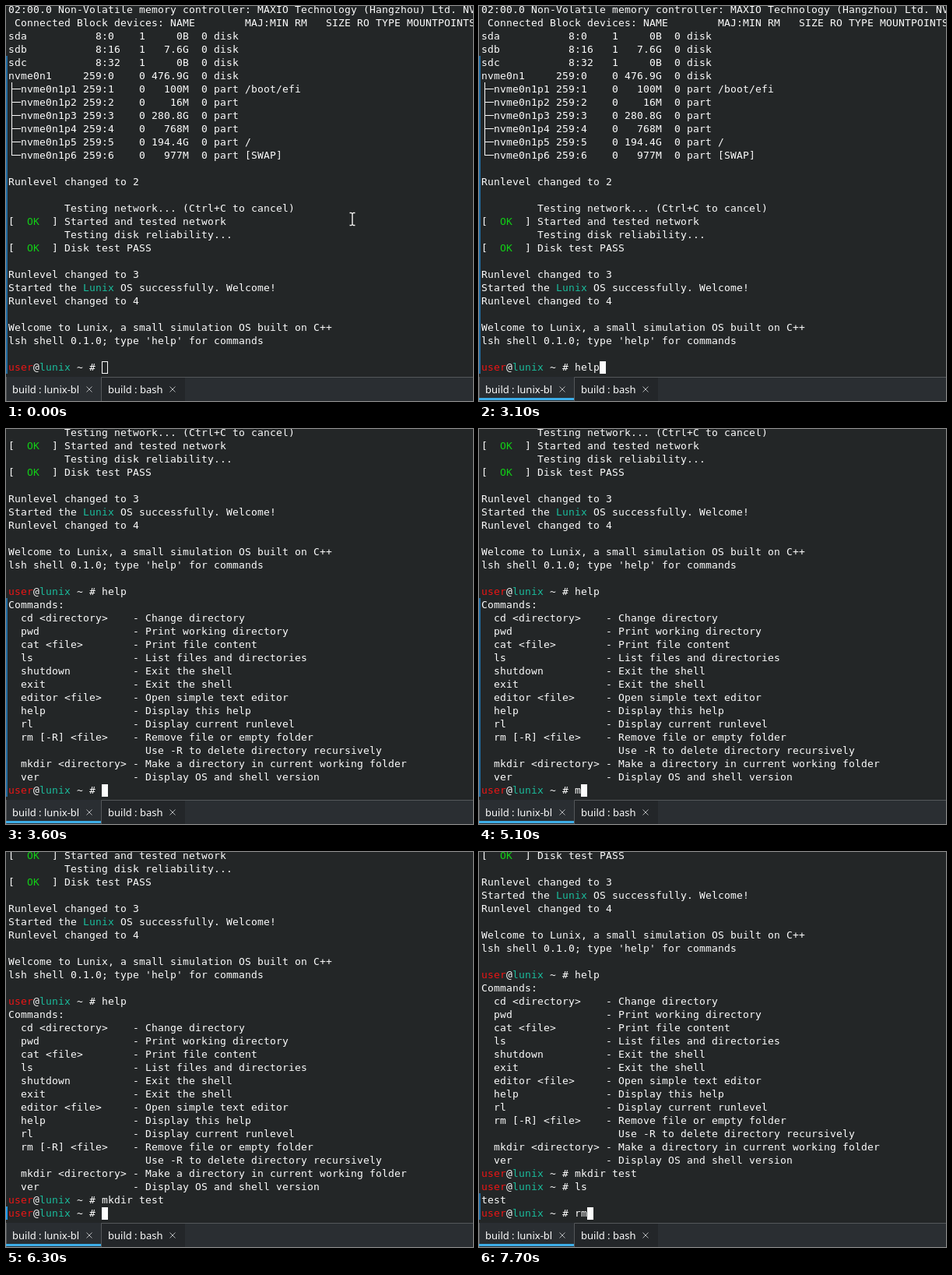
An HTML page that plays this animation: 600x507 px, repeating every 8000 ms.

```html
<!DOCTYPE html>
<html lang="en">
<head>
<meta charset="utf-8">
<title>Terminal session</title>
<style>
html, body { margin: 0; width: 100%; height: 100%; overflow: hidden; background: #232627; }
svg { display: block; width: 600px; height: 507px; }
text { white-space: pre; fill: #fcfcfc; }
.term text { font: 13px "DejaVu Sans Mono", monospace; }
.tabs text { font: 13px "Noto Sans", sans-serif; }
.r { fill: #ed1515; }
.g { fill: #11d116; }
.c { fill: #1abc9c; }
</style>
</head>
<body>
<svg viewBox="0 0 600 507" xmlns="http://www.w3.org/2000/svg">
  <rect width="600" height="507" fill="#232627"/>
  <g class="term" id="term">
    <g id="log">
      <path id="tree" fill="none" stroke="#fcfcfc" shape-rendering="crispEdges"/>
    </g>
    <rect id="bar" width="2"/>
    <g id="live"></g>
    <rect id="caret" y="456.5" width="7" height="15" stroke="#fcfcfc"/>
  </g>
  <g class="tabs">
    <rect y="476" width="600" height="31" fill="#2a2e32"/>
    <rect x="123" y="477" width="107" height="30" fill="#232629"/>
    <path d="M0.5 476V507M122.5 507V476.5H600" fill="none" stroke="#54575a"/>
    <rect id="focus" y="503" width="122" height="3" fill="#3daee9"/>
    <text x="8" y="497">build : lunix-bl</text>
    <text x="131" y="497">build : bash</text>
    <path d="M103.5 488.5l7 7m0-7l-7 7M210.5 488.5l7 7m0-7l-7 7" stroke="#b5b7b9"/>
  </g>
  <g id="mouse" fill="none">
    <path d="M441.5 265.5h2l1.5 1 1.5-1h2M445 266.5v14M441.5 281.5h2l1.5-1 1.5 1h2" stroke="#111" stroke-width="2.6"/>
    <path d="M441.5 265.5h2l1.5 1 1.5-1h2M445 266.5v14M441.5 281.5h2l1.5-1 1.5 1h2" stroke="#fff" stroke-width="1.4"/>
  </g>
</svg>
<script>
const LOOP = 8000, ROW = 17, COL = 8, LEFT = 3, LAST = 27, BASE = 9;
const PROMPT = '{r:user}@{c:lunix} ~ # ';
const $ = id => document.getElementById(id);

const pad = ' '.repeat(9);
const ok = msg => `[  {g:OK}  ] ${msg}`;
const cmd = (name, info) => ('  ' + name).padEnd(20) + '- ' + info;
const device = (name, id, rm, size, type, mount = '') =>
  `${name.padEnd(12)}${id.padEnd(7)} ${rm.padStart(2)} ${size.padStart(6)}  0 ${type} ${mount}`;
const part = (n, size, mount) =>
  device('  nvme0n1p' + n, '259:' + n, '0', size, 'part', mount);

const lines = [
  '02:00.0 Non-Volatile memory controller: MAXIO Technology (Hangzhou) Ltd. NV',
  ' Connected Block devices: NAME        MAJ:MIN RM   SIZE RO TYPE MOUNTPOINTS',
  device('sda', '  8:0', '1', '0B', 'disk'),
  device('sdb', '  8:16', '1', '7.6G', 'disk'),
  device('sdc', '  8:32', '1', '0B', 'disk'),
  device('nvme0n1', '259:0', '0', '476.9G', 'disk'),
  part(1, '100M', '/boot/efi'),
  part(2, '16M'),
  part(3, '280.8G'),
  part(4, '768M'),
  part(5, '194.4G', '/'),
  part(6, '977M', '[SWAP]'),
  '',
  'Runlevel changed to 2',
  '',
  pad + 'Testing network... (Ctrl+C to cancel)',
  ok('Started and tested network'),
  pad + 'Testing disk reliability...',
  ok('Disk test PASS'),
  '',
  'Runlevel changed to 3',
  'Started the {c:Lunix} OS successfully. Welcome!',
  'Runlevel changed to 4',
  '',
  'Welcome to Lunix, a small simulation OS built on C++',
  "lsh shell 0.1.0; type 'help' for commands",
  '',
  PROMPT + 'help',
  'Commands:',
  cmd('cd <directory>', 'Change directory'),
  cmd('pwd', 'Print working directory'),
  cmd('cat <file>', 'Print file content'),
  cmd('ls', 'List files and directories'),
  cmd('shutdown', 'Exit the shell'),
  cmd('exit', 'Exit the shell'),
  cmd('editor <file>', 'Open simple text editor'),
  cmd('help', 'Display this help'),
  cmd('rl', 'Display current runlevel'),
  cmd('rm [-R] <file>', 'Remove file or empty folder'),
  ' '.repeat(22) + 'Use -R to delete directory recursively',
  cmd('mkdir <directory>', 'Make a directory in current working folder'),
  cmd('ver', 'Display OS and shell version'),
  PROMPT + 'mkdir test',
  PROMPT + 'ls',
  'test'
];

// Each prompt: start time, line index, fresh rows marked by the bar, typed text over time.
const prompts = [
  { at: -1000, line: 27, fresh: 24, keys: [[2800, 'he'], [3100, 'help']] },
  { at: 3300, line: 42, fresh: 15, keys: [
    [5100, 'm'], [5200, 'mk'], [5400, 'mkd'], [5500, 'mkdi'], [5600, 'mkdir'],
    [5800, 'mkdir t'], [6000, 'mkdir tes'], [6100, 'mkdir test']] },
  { at: 6300, line: 43, fresh: 1, keys: [[6700, 'l'], [6800, 'ls']] },
  { at: 6900, line: 45, fresh: 2, keys: [[7600, 'r'], [7700, 'rm']] }
];

function svg(tag, attrs, parent) {
  const el = document.createElementNS('http://www.w3.org/2000/svg', tag);
  for (const key in attrs) el.setAttribute(key, attrs[key]);
  return parent.appendChild(el);
}

// Writes a line in which {r:word} marks a coloured word.
function write(line, row, parent) {
  const el = svg('text', { x: LEFT, y: BASE + row * ROW }, parent);
  for (const bit of line.split(/(\{\w:\w+\})/)) {
    const mark = bit.match(/^\{(\w):(\w+)\}$/);
    if (mark) svg('tspan', { class: mark[1] }, el).textContent = mark[2];
    else el.append(bit);
  }
  return el;
}

const rows = lines.map((line, i) => write(line, i, $('log')));
const live = svg('tspan', {}, write(PROMPT, LAST, $('live')));

// The terminal grid has whole-pixel cells; spacing makes up the font's own advance.
const advance = rows[0].getComputedTextLength() / lines[0].length;
$('term').style.letterSpacing = COL - advance + 'px';

let branches = 'M7.5 98V192';
for (let i = 0; i < 6; i++) branches += `M7 ${106.5 + i * ROW}H19`;
$('tree').setAttribute('d', branches);

const latest = (list, t, time) => list.filter(item => time(item) <= t).pop();
const show = (el, on) => el.setAttribute('visibility', on ? 'visible' : 'hidden');

function draw(t) {
  const now = latest(prompts, t, p => p.at);
  const key = latest(now.keys, t, k => k[0]);
  const typed = key ? key[1] : '';
  const focused = t >= 1200;

  $('log').setAttribute('transform', `translate(0 ${(LAST - now.line) * ROW})`);
  rows.forEach((row, i) => show(row, i < now.line));
  live.textContent = typed;

  const caret = $('caret');
  caret.setAttribute('x', LEFT + (15 + typed.length) * COL + 0.5);
  caret.setAttribute('fill', focused ? '#fcfcfc' : 'none');

  const bar = $('bar');
  bar.setAttribute('y', 472 - now.fresh * ROW);
  bar.setAttribute('height', now.fresh * ROW);
  bar.setAttribute('fill', t < now.at + 300 ? '#1d99f3' : '#206ca3');

  show($('focus'), focused);
  show($('mouse'), t < 2800);
}

const start = performance.now();
function tick() {
  draw((performance.now() - start) % LOOP);
  requestAnimationFrame(tick);
}
tick();
</script>
</body>
</html>
```
